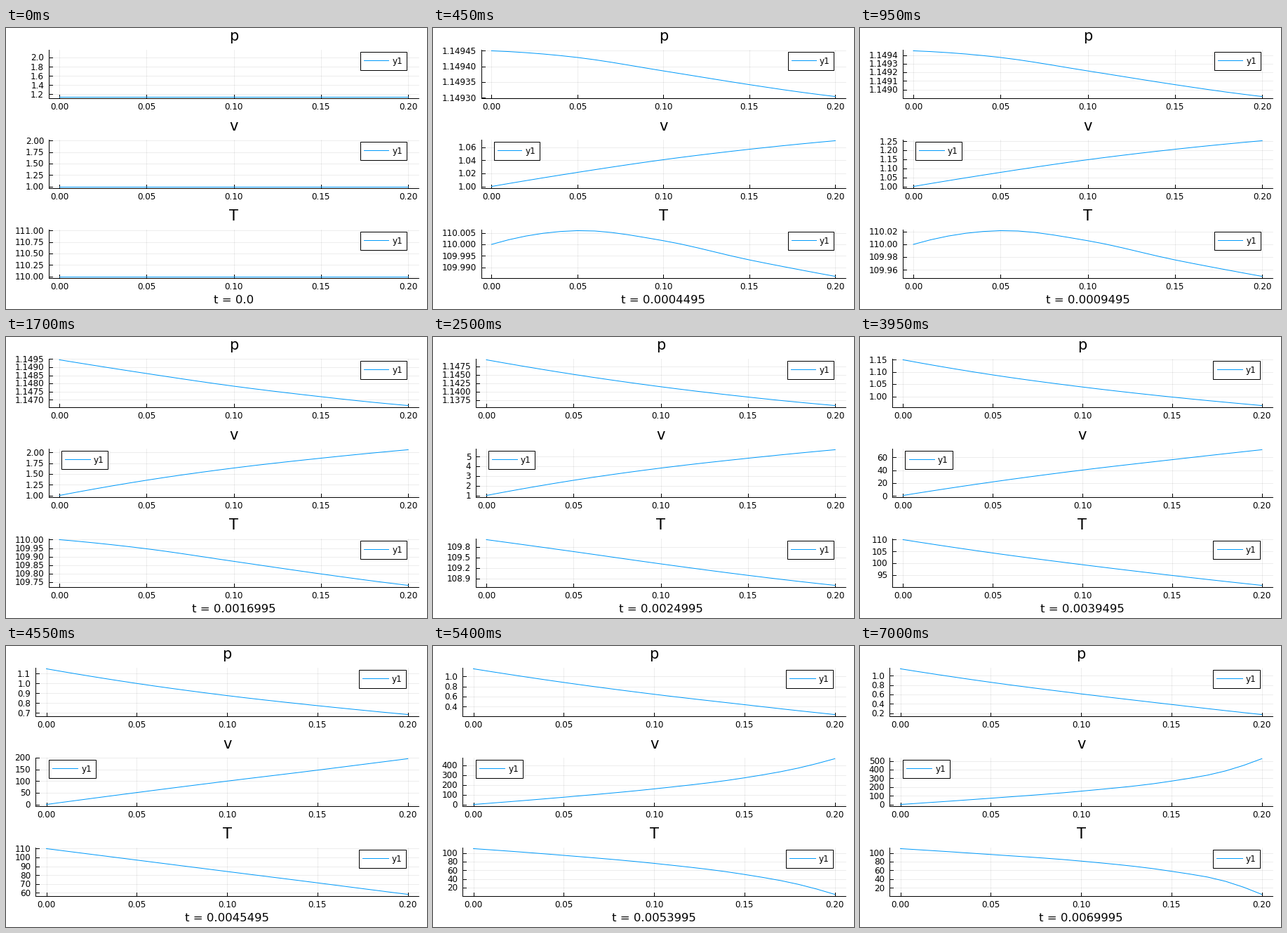
Animation of 600 by 400 pixels, one loop 7050 ms. Source, as a matplotlib script:

```python
import math

import matplotlib.pyplot as plt
import numpy as np
from matplotlib.animation import FuncAnimation
from matplotlib.patches import Rectangle

plt.rcParams["font.family"] = "DejaVu Sans"

FRAMES, INTERVAL = 141, 50
PX = 0.72                      # points per pixel at 100 dpi
BLUE = (0.0, 0.6056, 0.9787)
RIGHT, TOP, HEIGHT, PITCH = 588, 30.5, 69, 128
SMALL, MEDIUM, LARGE = 11.97, 16.46, 20.95

# Times in ms; the flow settles after the start of the last stretch.
KEYS = np.array([0.95, 1.7, 3.4, 4.55, 5.4, 5.7])
SETTLE = 0.3
NODES = np.array([0, 0.25, 0.5, 0.75, 0.9, 1])
GRID = np.linspace(0, 1, 21)

# name: inlet value, change at the outlet, shape of the change along the pipe
FIELDS = {
    "p": (1.14945, [-0.00053, -0.0028, -0.0692, -0.466, -0.905, -0.98],
          [[0.146, 0.44, 0.74, 0.905], [0.30, 0.577, 0.807, 0.93],
           [0.34, 0.603, 0.823, 0.933], [0.32, 0.586, 0.806, 0.925],
           [0.298, 0.557, 0.784, 0.917], [0.295, 0.548, 0.78, 0.915]]),
    "v": (1.0, [0.2535, 1.065, 25, 194.5, 469, 524],
          [[0.308, 0.585, 0.813, 0.93], [0.333, 0.60, 0.815, 0.93],
           [0.33, 0.597, 0.812, 0.928], [0.26, 0.51, 0.75, 0.90],
           [0.158, 0.34, 0.582, 0.797], [0.136, 0.29, 0.51, 0.733]]),
    "T": (110.0, [-0.0503, -0.269, -6.75, -51.7, -105.5, -105],
          [[-0.43, -0.115, 0.485, 0.80], [0.20, 0.475, 0.75, 0.905],
           [0.33, 0.592, 0.815, 0.93], [0.25, 0.50, 0.748, 0.90],
           [0.147, 0.322, 0.564, 0.782], [0.128, 0.272, 0.495, 0.715]]),
}


def hermite(x, xs, ys, edge=1):
    """Smooth curve through the points (xs, ys)."""
    ys = np.asarray(ys, float)
    m = np.gradient(ys, xs, edge_order=edge)
    i = np.clip(np.searchsorted(xs, x, side="right") - 1, 0, len(xs) - 2)
    h = xs[i + 1] - xs[i]
    u = (x - xs[i]) / h
    return (ys[i] * (1 + 2 * u) * (1 - u) ** 2 + h * m[i] * u * (1 - u) ** 2
            + ys[i + 1] * u * u * (3 - 2 * u) + h * m[i + 1] * u * u * (u - 1))


def growth(t):
    return np.expm1(1.8 * t)


def profile(name, ms):
    base, ends, shapes = FIELDS[name]
    if ms <= 0:
        return np.full(GRID.size, base)
    start = KEYS[-2]
    t = ms if ms < start else start + SETTLE * (1 - math.exp((start - ms) / SETTLE))
    s = max(t, KEYS[0])
    rate = np.log(np.abs(ends) / growth(KEYS))
    amp = np.sign(ends[0]) * math.exp(hermite(s, KEYS, rate)) * growth(t)
    inner = [np.interp(s, KEYS, column) for column in zip(*shapes)]
    return base + amp * hermite(GRID, NODES, [0, *inner, 1], edge=2)


def nice_ticks(lo, hi):
    """Pick four to eight round ticks by weighing count, zero, cover and step."""
    span = hi - lo
    top = math.floor(math.log10(span)) + 1
    best = None
    for z in range(top, top - 4, -1):
        for q, nice in ((1, 1), (5, 0.9), (2, 0.7), (2.5, 0.5), (3, 0.2)):
            step = q * 10.0 ** z
            a = math.ceil(lo / step - 1e-9)
            b = math.floor(hi / step + 1e-9)
            n = b - a + 1
            if not 4 <= n <= 8:
                continue
            score = (0.25 * (1 - abs(n - 5) / 5) + (a <= 0 <= b) / 6
                     + 0.5 * span / ((n - 1) * step) + 0.25 * nice)
            rank = (round(score, 6), -n)
            if best is None or rank > best[0]:
                digits = max(0, -z + (q == 2.5))
                best = rank, [i * step for i in range(a, b + 1)], digits
    _, ticks, digits = best
    return ticks, [f"{v:.{digits}f}" for v in ticks]


def label_width(s):
    return SMALL * sum(0.318 if c == "." else 0.636 for c in s)


def time_label(ms):
    return "t = " + repr(round(ms / 1000, 7)).replace("e-0", "e-")


fig = plt.figure(figsize=(6, 4), dpi=100, facecolor="white")
ax = fig.add_axes([0, 0, 1, 1])


def line(xs, ys, color="black", width=1.0, **kw):
    ax.plot(xs, ys, color=color, lw=width * PX, **kw)


def text(x, y, s, size, ha="center"):
    ax.text(x, y, s, fontsize=size * PX, ha=ha, va="baseline", color="black")


def legend(left, top, key):
    ax.add_patch(Rectangle((left, top), key + 31, 26, fc="white", ec="black",
                           lw=PX, zorder=4))
    line([left + 5.3, left + 5.3 + key], [top + 12.5] * 2, BLUE, zorder=5)
    ax.text(left + key + 10.5, top + 17, "y1", fontsize=SMALL * PX,
            va="baseline", zorder=5)


def panel(name, top, left, data, lo, hi, ticks, labels, legend_left):
    bottom, width = top + HEIGHT, RIGHT - left

    def to_x(f):
        return left + width * (f + 0.03) / 1.06

    def to_y(v):
        return bottom - HEIGHT * (v - lo) / (hi - lo)

    faint = dict(width=0.7, alpha=0.1, zorder=1)
    for i in range(5):
        x = to_x(i / 4)
        line([x, x], [top, bottom], **faint)
        line([x, x], [bottom, bottom - 5])
        text(x, bottom + 16, f"{i * 0.05:.2f}", SMALL)
    for v, s in zip(ticks, labels):
        y = to_y(v)
        line([left, RIGHT], [y, y], **faint)
        line([left, left + 5], [y, y])
        text(left - 7, y + 4.3, s, SMALL, "right")
    line([left, left], [top, bottom])
    line([left, RIGHT], [bottom, bottom])
    line(to_x(GRID), to_y(data), BLUE, zorder=3)
    text((left + RIGHT) / 2, top - 12, name, LARGE)

    key = width / 15
    if legend_left:
        legend(left + 0.0342 * width, top + 3, key)
    else:
        legend(RIGHT - 0.0323 * width - key - 31, top + 3, key)


def draw(k):
    ax.clear()
    ax.set(xlim=(0, 600), ylim=(400, 0))
    ax.set_axis_off()
    ms = max(0.0, k * 0.05 - 0.0005)

    plots = []
    for name in FIELDS:
        data = profile(name, ms)
        lo, hi = data.min(), data.max()
        if hi == lo:
            hi = lo + 1
        pad = 0.03 * (hi - lo)
        lo, hi = lo - pad, hi + pad
        plots.append((name, data, lo, hi, *nice_ticks(lo, hi)))

    left = 19.3 + max(label_width(s) for plot in plots for s in plot[-1])
    for i, (name, *rest) in enumerate(plots):
        panel(name, TOP + PITCH * i, left, *rest, name == "v" and k > 0)
    text((left + RIGHT) / 2, 392, time_label(ms), MEDIUM)
    return []


anim = FuncAnimation(fig, draw, frames=FRAMES, interval=INTERVAL,
                     init_func=lambda: [], repeat=True, repeat_delay=0)
plt.show()
```
